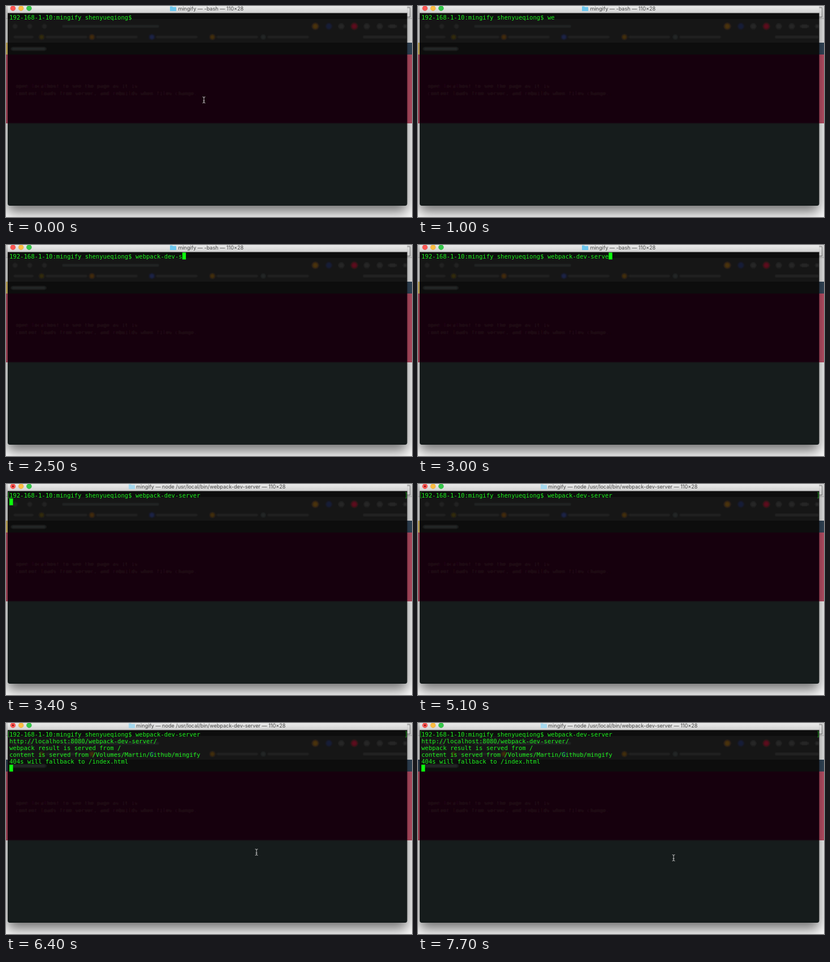
These frames come from a looping animation (718 by 374 pixels, 8000 ms). An HTML page:

```html
<!DOCTYPE html>
<html lang="en">
<head>
<meta charset="utf-8">
<title>Terminal</title>
<style>
  html, body { margin: 0; width: 100%; height: 100%; overflow: hidden; background: #fafafa; }
  svg { display: block; width: 718px; height: 374px; }
  .term { font: 10.58px "DejaVu Sans Mono", monospace; fill: #1df41d; white-space: pre; }
  .title { font: 9.1px Inter, sans-serif; fill: #444; text-anchor: middle; }
  .ghost { font: 9.2px "DejaVu Sans Mono", monospace; fill: #2b1a1f; }
</style>
</head>
<body>
<svg viewBox="0 0 718 374">
  <defs>
    <linearGradient id="bar" x2="0" y2="1">
      <stop stop-color="#ebebeb"/><stop offset="1" stop-color="#d0d0d0"/>
    </linearGradient>
    <filter id="shade" x="-10%" y="-20%" width="120%" height="140%"><feGaussianBlur stdDeviation="11"/></filter>
    <filter id="soft" x="-5%" y="-5%" width="110%" height="110%"><feGaussianBlur stdDeviation="1.6"/></filter>
    <filter id="faint"><feGaussianBlur stdDeviation="0.8"/></filter>
    <clipPath id="pane"><path d="M3 12H709.5V350a4 4 0 0 1-4 4H7a4 4 0 0 1-4-4Z"/></clipPath>
  </defs>

  <!-- page behind the window -->
  <rect width="718" height="374" fill="#fafafa"/>
  <rect width="718" height="65" fill="#f0f0f0"/>
  <rect width="718" height="22" fill="#e2e2e2"/>
  <rect x="690" y="3" width="24.5" height="16.5" fill="#fcfcfc" stroke="#888"/>
  <path d="M0 22.5H718" stroke="#c4c4c4"/>
  <rect y="65" width="718" height="21" fill="#34485c"/>
  <rect id="edge" y="65" width="4" height="21" fill="#e6c86a"/>
  <rect y="86" width="718" height="122" fill="#c2526a"/>
  <rect x="3" y="4" width="706" height="361" fill="#000" opacity=".55" filter="url(#shade)"/>

  <!-- window -->
  <g clip-path="url(#pane)">
    <g filter="url(#soft)">
      <rect x="-10" width="738" height="400" fill="#191b1a"/>
      <rect x="-10" width="738" height="66" fill="#141515"/>
      <rect x="-10" width="738" height="23" fill="#0f1010"/>
      <rect x="85" y="29" width="472" height="15" fill="#181919"/>
      <rect x="-10" y="65" width="738" height="21" fill="#090b0c"/>
      <rect x="-10" y="86" width="738" height="122" fill="#13060a"/>
      <g id="blobs"></g>
    </g>
    <g class="ghost" filter="url(#faint)">
      <text x="17" y="145">open localhost to see the page as it is</text>
      <text x="17" y="158">content loads from server, and rebuilds when files change..</text>
    </g>
  </g>
  <rect x="3" width="706.5" height="12.5" fill="url(#bar)"/>
  <path d="M3 12.3H709.5" stroke="#777" stroke-width=".6"/>
  <g stroke-width=".6">
    <circle cx="12.3" cy="4" r="4.4" fill="#fc5753" stroke="#df4744"/>
    <circle cx="26.6" cy="4" r="4.4" fill="#fdbc40" stroke="#de9f34"/>
    <circle cx="40.8" cy="4" r="4.4" fill="#34c84a" stroke="#27aa35"/>
  </g>
  <circle id="busy" cx="12.3" cy="4" r="1.5" fill="#7a0c08"/>
  <path id="folder" d="M0 .8h4l1 1h6V9H0Z" fill="#6cc6ee"/>
  <text id="title" class="title" x="362.3" y="8"></text>

  <!-- terminal text -->
  <path id="marks" d="M6 15H4.5V25H6M706.5 15H708V25H706.5" fill="none" stroke="#17b317" stroke-width=".9"/>
  <g id="lines" class="term"></g>
  <rect id="block" width="6.4" height="12.2" fill="#0cfb0c"/>
  <g id="mouse" fill="none" stroke-linecap="round">
    <path d="M-2-5.5Q0-5.5 0-4Q0-5.5 2-5.5M0-4V4M-2 5.5Q0 5.5 0 4Q0 5.5 2 5.5M-1 1.5H1" stroke="#c8c8c8" stroke-width="1"/>
  </g>
</svg>
<script>
const $ = id => document.getElementById(id);
const NS = 'http://www.w3.org/2000/svg';
const LOOP = 8000, CELL = 6.37, ROW = 12.1, LEFT = 6, TOP = 13.4;
const prompt = '192-168-1-10:mingify shenyueqiong$ ';
const command = 'webpack-dev-server';
const output = [
  'http://localhost:8080/webpack-dev-server/',
  'webpack result is served from /',
  'content is served from /Volumes/Martin/Github/mingify',
  '404s will fallback to /index.html'
];
const RUN = 3200, PRINT = 6300;

// [time, value] steps
const typed = [[0, 0], [400, 1], [500, 2], [1200, 3], [1500, 4], [1600, 5], [1700, 7], [1800, 8],
  [1900, 9], [2000, 10], [2100, 11], [2300, 12], [2500, 13], [2600, 14], [2700, 15], [2900, 16],
  [3000, 17], [3100, 18]];
const blink = [[0, 0], [400, 1], [1000, 0], [1200, 1], [4000, 0], [4500, 1], [5100, 0], [5600, 1],
  [6100, 0], [6300, 1], [7200, 0], [7700, 1]];
const pointer = [[0, [350, 166.5]], [400, null], [6300, [440, 225]], [6400, [443, 229]],
  [6500, [448, 235]], [6600, [452, 239]]];

const at = (steps, t) => steps.reduce((v, [s, x]) => t >= s ? x : v, null);
const show = (el, on) => el.setAttribute('visibility', on ? 'visible' : 'hidden');

function add(parent, tag, attrs) {
  const el = document.createElementNS(NS, tag);
  for (const k in attrs) el.setAttribute(k, attrs[k]);
  return parent.appendChild(el);
}

// dim browser chrome seen through the window
const dot = (x, y, fill, r = 5) => add($('blobs'), 'circle', { cx: x, cy: y, r, fill });
const strip = (x, y, width, fill = '#222323') =>
  add($('blobs'), 'rect', { x, y: y - 2, width, height: 4, fill });
[16, 42, 68].forEach(x => dot(x, 36, '#202121', 4));
strip(100, 36, 170, '#242525');
[[547, '#4a3010'], [571, '#171f38'], [593, '#262727'], [616, '#5c0d1c'], [638, '#262727'], [661, '#262727']]
  .forEach(([x, c]) => dot(x, 36, c));
strip(677, 36, 13, '#2a2b2b');
dot(706, 36, '#2a2b2b', 3);
[[63, '#33290f'], [152, '#432c10'], [258, '#1a2346'], [365, '#432f10'], [455, '#242525']]
  .forEach(([x, c]) => { dot(x, 55, c, 4); strip(x + 8, 55, 72); });
strip(14, 55, 34);
strip(632, 55, 76, '#262727');
strip(10, 76, 60, '#272a2b');

const rows = [0, 1, 2, 3, 4].map(i =>
  add($('lines'), 'text', { x: LEFT, y: (TOP + 10.2 + i * ROW).toFixed(1) }));

function draw(t) {
  const n = at(typed, t), running = t >= RUN, printed = t >= PRINT;
  const row = printed ? 5 : running ? 1 : 0;
  const col = running ? 0 : prompt.length + n;
  rows[0].textContent = prompt + command.slice(0, n);
  output.forEach((s, i) => rows[i + 1].textContent = printed ? s : '');

  $('title').textContent = 'mingify — ' +
    (running ? 'node /usr/local/bin/webpack-dev-server' : '-bash') + ' — 110×28';
  $('folder').setAttribute('transform', `translate(${running ? 217 : 290} 0)`);
  $('folder').setAttribute('fill', running ? '#a5d8ee' : '#6cc6ee');
  show($('busy'), running);
  show($('marks'), running);
  show($('edge'), t < 6100);

  $('block').setAttribute('x', LEFT + col * CELL);
  $('block').setAttribute('y', TOP + row * ROW);
  show($('block'), at(blink, t));

  const p = at(pointer, t);
  show($('mouse'), p);
  if (p) $('mouse').setAttribute('transform', `translate(${p})`);
}

const start = performance.now();
function tick(now) {
  draw(Math.max(0, now - start) % LOOP);
  requestAnimationFrame(tick);
}
draw(0);
requestAnimationFrame(tick);
</script>
</body>
</html>
```
